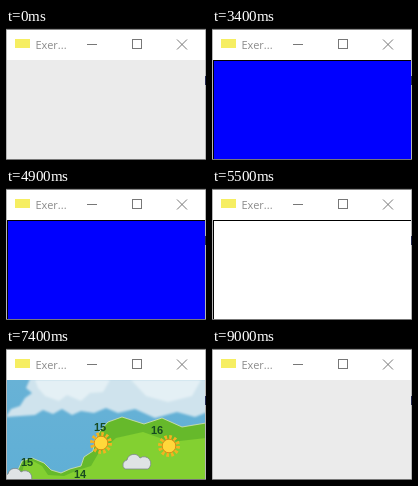
Animation, 200 px wide and 132 px high, one loop 9100 ms. Source, as an HTML page:

```html
<!DOCTYPE html>
<html lang="en">
<head>
<meta charset="utf-8">
<title>Exercise</title>
<style>
  html, body { margin: 0; width: 100%; height: 100%; overflow: hidden; background: #fff; }
  svg { display: block; width: 100vw; height: 100vh; }
  .title { font: 11px "Open Sans", "Noto Sans", sans-serif; fill: #8b8b8b; }
  .label { font: 12.3px "Liberation Sans", Arial, sans-serif; }
  .temp { font: bold 11px "Liberation Sans", Arial, sans-serif; fill: #174a21; }
  .anim { animation: 9100ms step-end infinite; }
  .box { stroke: #000; width: 20px; height: 20px; visibility: hidden; }
  .outer { animation-name: outer; }
  .inner { animation-name: inner; }
  .label { animation-name: label; visibility: hidden; }
  .map { animation-name: map; visibility: hidden; }

  @keyframes outer {
    0% { visibility: hidden; fill: #00f; width: 20px; height: 20px; }
    31.868% { visibility: visible; fill: #00f; width: 20px; height: 20px; }
    37.362% { visibility: visible; fill: #00f; width: 300px; height: 200px; }
    42.857% { visibility: visible; fill: #ff0; width: 300px; height: 200px; }
    97.802%, 100% { visibility: hidden; fill: #ff0; width: 300px; height: 200px; }
  }
  @keyframes inner {
    0% { visibility: hidden; fill: #00f; width: 20px; height: 20px; }
    48.351% { visibility: visible; fill: #00f; width: 20px; height: 20px; }
    53.846% { visibility: visible; fill: #00f; width: 300px; height: 200px; }
    59.340% { visibility: visible; fill: #fff; width: 300px; height: 200px; }
    97.802%, 100% { visibility: hidden; fill: #fff; width: 300px; height: 200px; }
  }
  @keyframes label {
    0% { visibility: hidden; fill: #00f; transform: none; }
    64.835% { visibility: visible; fill: #00f; transform: none; }
    70.329% { visibility: visible; fill: #00f; transform: translate(10px, 10px); }
    75.824% { visibility: visible; fill: #000; transform: translate(10px, 10px); }
    97.802%, 100% { visibility: hidden; fill: #000; transform: translate(10px, 10px); }
  }
  @keyframes map {
    0% { visibility: hidden; transform: none; }
    81.318% { visibility: visible; transform: none; }
    86.813% { visibility: visible; transform: translate(100px, 0); }
    92.307%, 100% { visibility: hidden; transform: translate(100px, 0); }
  }
</style>
</head>
<body>
<svg viewBox="0 0 200 132" preserveAspectRatio="none">
  <defs>
    <clipPath id="pane"><rect x="1" y="32" width="198" height="99"/></clipPath>
    <linearGradient id="sea" x2="0" y2="1">
      <stop offset="0" stop-color="#68b2d6"/>
      <stop offset="1" stop-color="#5fafd6"/>
    </linearGradient>
    <filter id="soft"><feGaussianBlur stdDeviation="1"/></filter>
    <g id="sun">
      <circle r="9" fill="none" stroke="#f3b320" stroke-width="4" stroke-dasharray="2.5 2.21"/>
      <circle r="6.8" fill="#ffd83a" stroke="#e08a16"/>
    </g>
    <path id="cloud" d="M-11 6a5 5 0 0 1 2-9a7 7 0 0 1 13-2a6 6 0 0 1 8 11z" fill="#dfe3e5" stroke="#7d878c" stroke-width=".8"/>
  </defs>

  <!-- window -->
  <rect width="200" height="132" fill="#fff"/>
  <rect y="32" width="200" height="100" fill="#ebebeb"/>
  <rect width="200" height="1.5" fill="#111"/>
  <rect x="9" y="11" width="15" height="9" fill="#f6ee62"/>
  <text class="title" x="29.5" y="20.5">Exer...</text>
  <g fill="none" stroke="#777">
    <path d="M81 16.5h10M171 11.5l10 10M181 11.5l-10 10"/>
    <rect x="126.5" y="11.5" width="9" height="9"/>
  </g>

  <!-- drawing pane -->
  <g clip-path="url(#pane)">
    <rect class="anim box outer" x="1.5" y="32.5"/>
    <rect class="anim box inner" x="1.5" y="32.5"/>
    <text class="anim label" x="0" y="45">"Hello world"</text>
    <g class="anim map">
      <rect y="32" width="200" height="100" fill="url(#sea)"/>
      <g filter="url(#soft)">
        <path d="M0 69l5-8 9-3 5-8 7-5-6-5 4-9h180v32l-15 6-18-5-22 6-20-9-17 4-12-5-12 5-13-2-9 4-10-6-9 5-10-4-8 5z" fill="#cfe3ed"/>
        <path d="M29 32h75l-7 12-13 1-9 8-14-6-8 6-14-5-7-8zM125 32h70l-9 16-24 6-22-6z" fill="#e4f0f5"/>
      </g>
      <path d="M0 127l12-5 4-9 10-3 12 5 7 7 10 3 9-4 11-3 3-9 9-6 2-11 5-9 8-9 14-5 22 7 18-6 20 9 24-4v60H0z" fill="#66b92b" stroke="#d8e4b0" stroke-width=".8"/>
      <path d="M14 132l4-15 9-4 9 5 6 9 16 1 14-6 13-4 7-12 18-16 27-6 28 10 35-4v44z" fill="#83d031"/>
      <use href="#sun" x="95" y="95"/>
      <use href="#sun" x="163" y="98"/>
      <use href="#cloud" x="11" y="129"/>
      <use href="#cloud" x="130" y="115"/>
      <g class="temp">
        <text x="88" y="83">15</text>
        <text x="68" y="130">14</text>
        <text x="15" y="118">15</text>
        <text x="145" y="86">16</text>
      </g>
    </g>
  </g>

  <path d="M.5 2v130M199.5 2v130" stroke="#a6a6a6" stroke-width=".8"/>
  <path d="M0 131.5h200" stroke="#777"/>
  <rect x="199" y="48" width="1" height="9" fill="#23294f"/>
</svg>
</body>
</html>
```
